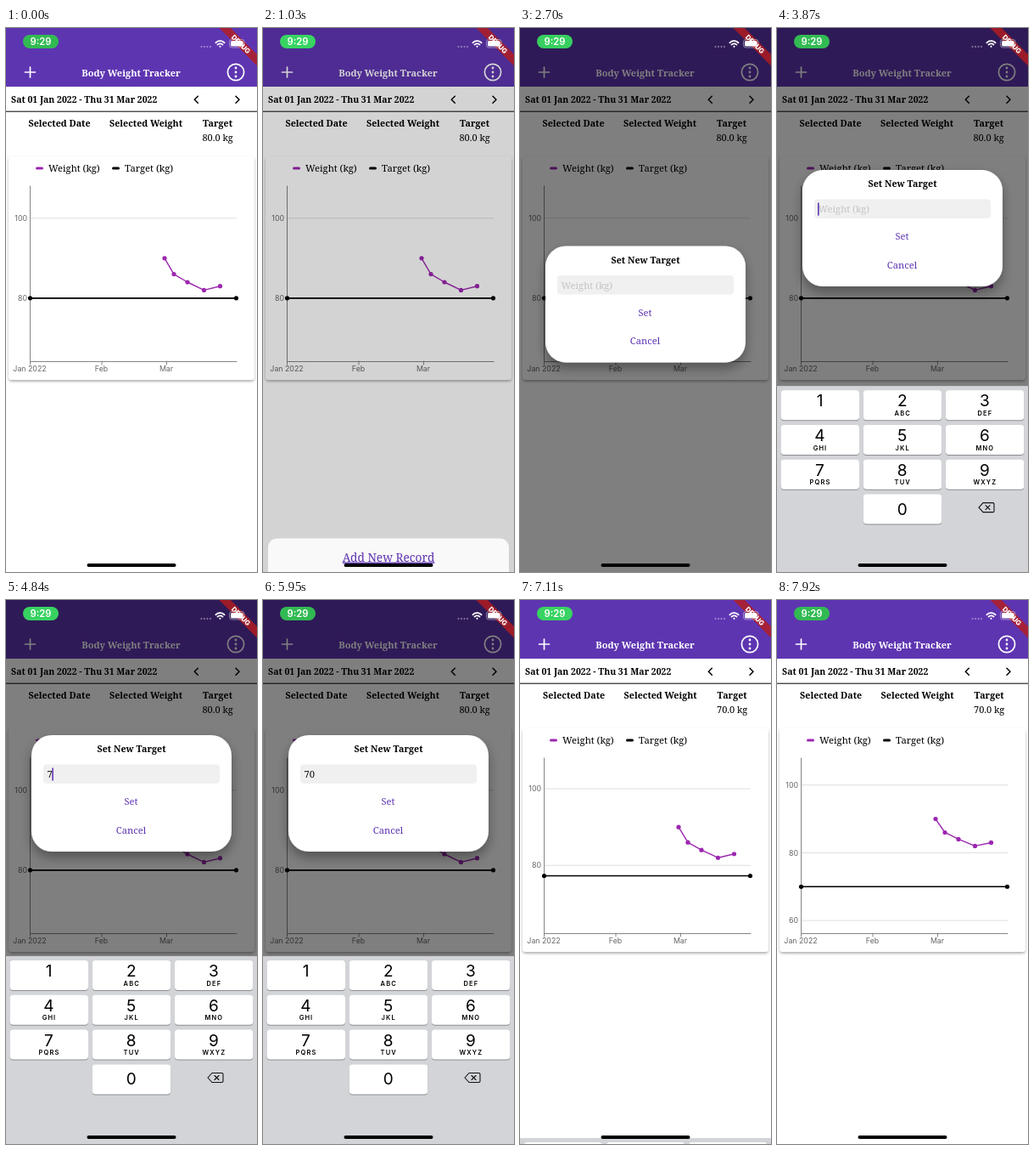
These frames come from a looping animation (296 px wide and 640 px high, 8 s). An HTML page:

```html
<!DOCTYPE html>
<html lang="en">
<head>
<meta charset="utf-8">
<title>Body Weight Tracker</title>
<style>
  html, body { margin: 0; width: 100%; height: 100%; overflow: hidden; background: #fff; }
  svg { display: block; width: 100vw; height: 100vh; }
  text { font-family: "Noto Serif", serif; font-size: 11.2px; }
  .bold { font-weight: 700; font-size: 10.7px; }
  .mid { text-anchor: middle; }
  .ui { font-family: Inter, "Liberation Sans", sans-serif; }
  .axis text { font-size: 8.8px; fill: #666; }
  .accent { fill: #5e35b1; }
  .sheet text { font-size: 13.7px; text-decoration: underline; }
  .line { fill: none; stroke-linecap: round; stroke-linejoin: round; }
  .digit { font-size: 19px; }
  .letters { font-size: 7.5px; font-weight: 600; letter-spacing: 1.1px; }
</style>
</head>
<body>
<svg viewBox="0 0 296 640" preserveAspectRatio="none">
  <defs>
    <filter id="cardShadow" x="-5%" y="-5%" width="110%" height="112%">
      <feDropShadow dx="0" dy="1.8" stdDeviation="1.4" flood-opacity=".32"/>
    </filter>
    <filter id="dialogShadow" x="-20%" y="-20%" width="140%" height="160%">
      <feDropShadow dx="0" dy="7" stdDeviation="7" flood-opacity=".35"/>
    </filter>
  </defs>
  <rect width="296" height="640" fill="#fff"/>

  <!-- app bar -->
  <rect width="296" height="69" fill="#5e35b1"/>
  <text class="bold mid" x="147.5" y="56.5" fill="#fff" style="font-size:11px">Body Weight Tracker</text>
  <g class="line" stroke="#fff" stroke-width="1.7">
    <path d="M22.5 52H34.5M28.5 46V58"/>
    <circle cx="271" cy="52" r="9.6"/>
    <path stroke-width="2.8" d="M271 47h0M271 52h0M271 57h0"/>
  </g>

  <!-- period and summary -->
  <text class="bold" x="6" y="88" style="font-size:10.5px">Sat 01 Jan 2022 - Thu 31 Mar 2022</text>
  <path class="line" stroke="#000" stroke-width="1.5" d="M226.3 80.3l-4 4 4 4M271 80.3l4 4-4 4"/>
  <path stroke="#000" d="M0 98.2H296"/>
  <g id="summary" class="mid">
    <text class="bold" x="63" y="116">Selected Date</text>
    <text class="bold" x="165" y="116">Selected Weight</text>
    <text class="bold" x="249.5" y="116">Target</text>
    <text id="targetText" x="249.5" y="133" style="font-size:11px"></text>
  </g>

  <!-- chart -->
  <rect x="3" y="151" width="290" height="263" rx="4" fill="#fff" filter="url(#cardShadow)"/>
  <path class="line" stroke="#9c27b0" stroke-width="3" d="M36.5 165H42.5"/>
  <path class="line" stroke="#000" stroke-width="3" d="M126.5 165H132.5"/>
  <text x="50" y="169">Weight (kg)</text>
  <text x="140" y="169">Target (kg)</text>
  <g id="grid" class="axis"></g>
  <path class="line" stroke="#858585" d="M28.5 186V392.5H272M28.5 392V396M113 392V396M189.5 392V396"/>
  <g class="axis mid">
    <text class="ui" x="28" y="403.5">Jan 2022</text>
    <text class="ui" x="112.5" y="403.5">Feb</text>
    <text class="ui" x="189" y="403.5">Mar</text>
  </g>
  <g id="weights" fill="#9c27b0"></g>
  <g id="target">
    <path stroke="#000" stroke-width="1.7" d="M28.5 0H271.5"/>
    <circle cx="28.5" r="2.6"/><circle cx="271.5" r="2.6"/>
  </g>

  <rect id="dim" width="296" height="640"/>

  <!-- action sheet -->
  <g id="sheet" class="sheet mid">
    <rect x="6" width="284" height="90" rx="10.5" fill="#f9f9f9"/>
    <path stroke="#d2d2d5" stroke-width=".7" d="M6 45H290"/>
    <rect x="6" y="96" width="284" height="45" rx="10.5" fill="#fff"/>
    <text class="accent" x="148" y="27">Add New Record</text>
    <text class="accent" x="148" y="72">Set New Target</text>
    <text class="accent" x="148" y="123">Cancel</text>
  </g>

  <!-- dialog -->
  <g id="dialog">
    <rect x="30" width="236" height="137" rx="24" fill="#fff" filter="url(#dialogShadow)"/>
    <text class="bold mid" x="148" y="20">Set New Target</text>
    <rect id="field" x="44" y="34.5" width="208" height="22.5" rx="4"/>
    <text id="entry" x="48.5" y="50"></text>
    <rect id="caret" class="accent" y="38.5" width="1.6" height="15"/>
    <text id="setButton" class="mid" x="147.5" y="82.3">Set</text>
    <text class="accent mid" x="147.5" y="115.5">Cancel</text>
  </g>

  <g id="keyboard">
    <rect width="296" height="225" fill="#d2d4d8"/>
    <path class="line" stroke="#111" stroke-width="1.1"
      d="M243 137.5H254.5q1.5 0 1.5 1.5v8q0 1.5-1.5 1.5H243l-5-5.5zM246 140.5l5 5M251 140.5l-5 5"/>
  </g>

  <!-- debug ribbon and status bar -->
  <g transform="translate(296 0) rotate(45)">
    <rect x="-34" y="22" width="68" height="9.5" fill="#b71c1c" opacity=".8"/>
    <text class="ui mid" y="29.7" fill="#fff" style="font-size:8px;font-weight:800">DEBUG</text>
  </g>
  <rect id="pill" x="20" y="8" width="42" height="16" rx="8"/>
  <text class="ui mid" x="41" y="20" fill="#fff" style="font-size:11.2px;font-weight:600">9:29</text>
  <path class="line" stroke="#fff" stroke-opacity=".45" stroke-width="2" d="M230.5 22h0M234 22h0M237.5 22h0M241 22h0"/>
  <g class="line" stroke="#fff" stroke-width="1.7">
    <path d="M247.4 17.4a7 7 0 0 1 10.2 0M249.5 19.7a4.2 4.2 0 0 1 6 0"/>
    <path stroke-width="2.2" d="M252.5 21.8h0"/>
  </g>
  <rect x="263.5" y="13.5" width="17.5" height="9.5" rx="2.8" fill="none" stroke="#fff" stroke-opacity=".45"/>
  <rect x="265" y="15" width="14.5" height="6.5" rx="1.6" fill="#fff"/>
  <rect x="95.5" y="630" width="105" height="4" rx="2"/>
</svg>
<script>
const LOOP = 8000;
const WEIGHTS = [[187, 90], [198, 86], [214, 84], [233.5, 82], [252.5, 83]];
const KEYS = ["1", "2 ABC", "3 DEF", "4 GHI", "5 JKL", "6 MNO", "7 PQRS", "8 TUV", "9 WXYZ", "0"];

const el = id => document.getElementById(id);
const set = (node, attrs) => {
  for (const name in attrs) node.setAttribute(name, attrs[name]);
  return node;
};
const add = (parent, tag, attrs, text = "") => {
  const node = set(document.createElementNS("http://www.w3.org/2000/svg", tag), attrs);
  node.textContent = text;
  return parent.appendChild(node);
};
const moveY = (id, y) => set(el(id), { transform: `translate(0 ${y})` });
const setText = (id, text) => {
  if (el(id).textContent !== text) el(id).textContent = text;
};

const clamp = x => Math.min(1, Math.max(0, x));
const within = (t, from, to) => t >= from && t < to;
const mix = (a, b, p) => a + (b - a) * p;
const smooth = (t, from, to) => {
  const x = clamp((t - from) / (to - from));
  return x * x * (3 - 2 * x);
};
const easeOut = (t, from, to) => 1 - (1 - clamp((t - from) / (to - from))) ** 3;
// Critically damped spring, as used by the system keyboard.
const spring = (t, from) => {
  const x = Math.max(0, t - from) * 0.018;
  return 1 - (1 + x) * Math.exp(-x);
};

const grid = [100, 80, 60].map(value => {
  const group = add(el("grid"), "g", {});
  add(group, "path", { d: "M29 0H272", stroke: "#dedede" });
  add(group, "text", { class: "ui", x: 25, y: 3.2, "text-anchor": "end" }, value);
  return { value, group };
});
const weightLine = add(el("weights"), "polyline", { class: "line", stroke: "#9c27b0", "stroke-width": 1.4 });
const weightDots = WEIGHTS.map(([cx]) => add(el("weights"), "circle", { cx, r: 2.6 }));

const keyFaces = {};
KEYS.forEach((label, i) => {
  const [digit, letters] = label.split(" ");
  const column = digit === "0" ? 1 : i % 3;
  const x = 4.5 + 97.2 * column, y = 5 + 40.8 * Math.floor(i / 3);
  const box = { x, width: 92.5, height: 35, rx: 4 };
  add(el("keyboard"), "rect", { ...box, y: y + 1, fill: "#8b8d91" });
  keyFaces[digit] = add(el("keyboard"), "rect", { ...box, y, fill: "#fff" });
  add(el("keyboard"), "text", { class: "ui digit mid", x: x + 46, y: y + (digit === "0" ? 24 : 19) }, digit);
  if (letters) add(el("keyboard"), "text", { class: "ui letters mid", x: x + 46.5, y: y + 29.6 }, letters);
});

function drawChart(t) {
  const p = smooth(t, 6960, 7400);
  const base = mix(317.8, 297.4, p), unit = mix(4.7, 3.985, p);
  const yOf = value => base - (value - 80) * unit;
  for (const { value, group } of grid) {
    set(group, { transform: `translate(0 ${yOf(value)})`, opacity: yOf(value) < 390 ? 1 : 0 });
  }
  set(weightLine, { points: WEIGHTS.map(([x, w]) => [x, yOf(w)]).join(" ") });
  weightDots.forEach((dot, i) => set(dot, { cy: yOf(WEIGHTS[i][1]) }));
  moveY("target", yOf(mix(80, 70, p)));
  const updated = t >= 6960;
  setText("targetText", updated ? "70.0 kg" : "80.0 kg");
  set(el("summary"), { transform: `translate(${updated ? 0.6 : 0} 0)` });
}

function drawDialog(t, opacity) {
  const typed = t < 4700 ? "" : t < 5320 ? "7" : "70";
  const lastInput = [5320, 4700, 3480].find(time => t >= time);
  const focused = within(t, 3480, 6810);
  const blinkOn = Math.floor((t - lastInput) / 500) % 2 === 0;

  moveY("dialog", 256.5 - 97.5 * (spring(t, 3642) - spring(t, 6955)));
  set(el("dialog"), { opacity });
  setText("entry", typed || "Weight (kg)");
  set(el("entry"), { fill: typed ? "#111" : "#c4c4c6" });
  set(el("caret"), { x: 48 + typed.length * 6.3, opacity: focused && blinkOn ? 1 : 0 });
  set(el("field"), { fill: t < 6810 ? "#f0f0f0" : "#dcdee0" });
  set(el("setButton"), { fill: t < 6790 ? "#5e35b1" : "#bdbdc0" });
}

function draw(t) {
  const sheetDim = smooth(t, 870, 1080) - smooth(t, 1960, 2200);
  const dialogShown = smooth(t, 2180, 2420) - smooth(t, 6838, 7038);

  drawChart(t);
  set(el("dim"), { opacity: 1 - (1 - 0.2 * sheetDim) * (1 - 0.5 * dialogShown) });
  moveY("sheet", 646 - 180 * (easeOut(t, 1000, 1335) - smooth(t, 1940, 2240)));
  drawDialog(t, dialogShown);

  moveY("keyboard", 641 - 222 * (spring(t, 3500) - spring(t, 6826)));
  set(keyFaces[7], { fill: within(t, 4600, 4780) ? "#b2b6be" : "#fff" });
  set(keyFaces[0], { fill: within(t, 5220, 5400) ? "#b2b6be" : "#fff" });

  const glow = (1 - Math.cos(t * Math.PI / 1000)) / 2;
  set(el("pill"), { fill: `rgb(${mix(50, 56, glow)} ${mix(186, 212, glow)} ${mix(82, 98, glow)})` });
}

function tick() {
  draw(performance.now() % LOOP);
  requestAnimationFrame(tick);
}
tick();
</script>
</body>
</html>
```
